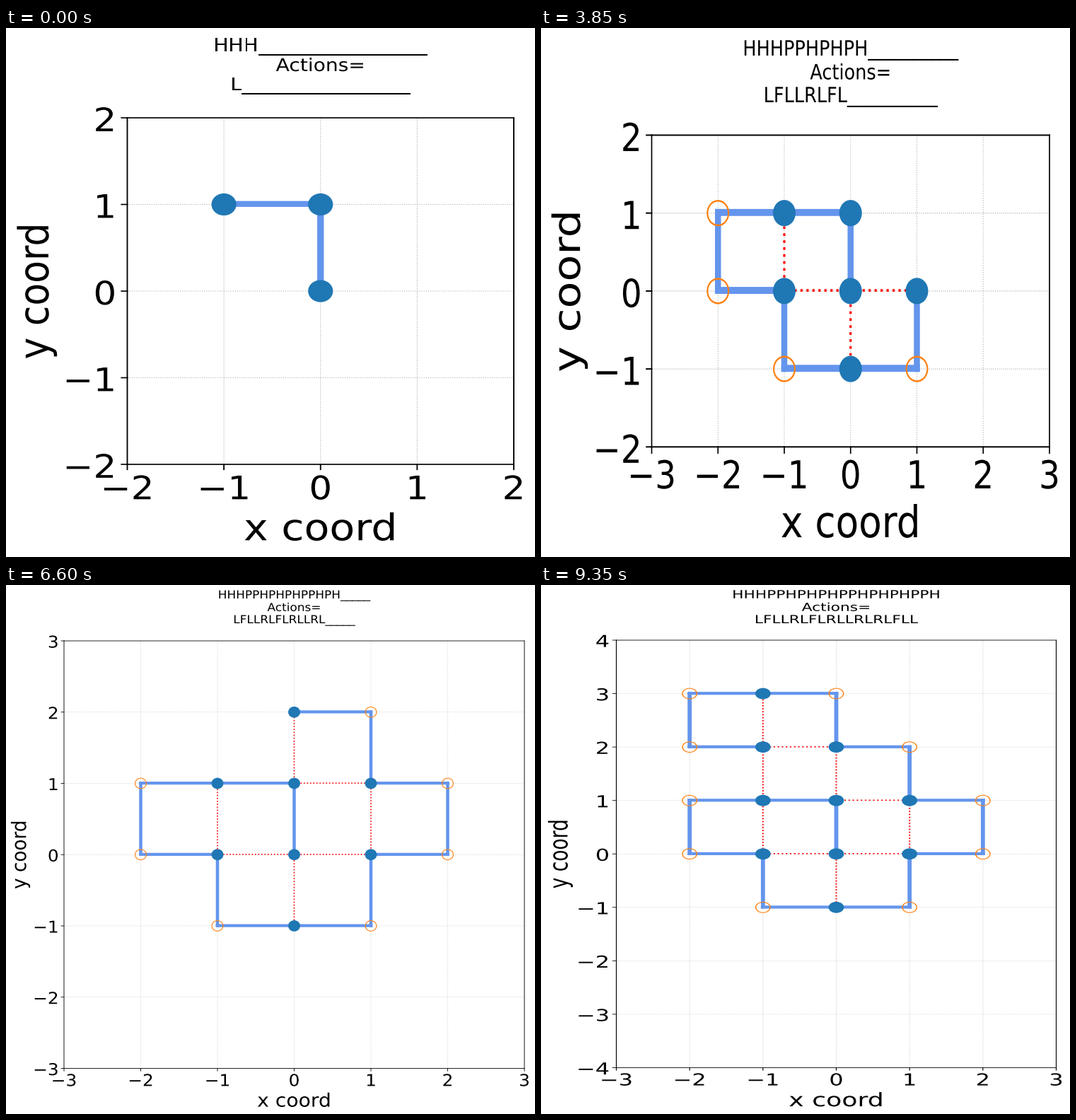
These frames come from a looping animation (748x748 px, 9.9 s). A matplotlib script:

```python
import matplotlib.pyplot as plt
from matplotlib.animation import FuncAnimation
from matplotlib.lines import Line2D
from matplotlib.patches import PathPatch, Rectangle
from matplotlib.path import Path
from matplotlib.textpath import TextPath
from matplotlib.transforms import Affine2D

STAGE, DPI = 748, 88
PX = 72 / DPI
SEQUENCE = "HHHPPHPHPHPPHPHPHPPH"
ACTIONS = "LFLLRLFLRLLRLRLFLL"
EDGE, FILLED, OPEN = "#6495ed", "#1f77b4", "#ff7f0e"
LABEL, TICK = 25, 22

# first step, axes box (left, right, top, bottom), x limit range, y limit,
# pixels per point in x and y, title size, top of the title
LAYOUTS = [
    (0, (171.5, 718, 127, 617), (-2, 2), 2, (2.344, 2.08), 12, 14.5),
    (1, (156.5, 719, 151.5, 592.3), (-3, 3), 2, (2.13, 2.476), 12, 17.3),
    (8, (77.5, 734.5, 103, 664), (-3, 3), 2, (1.048, 1.345), 15, 9.7),
    (11, (82, 733, 79, 683.5), (-3, 3), 3, (1.128, 1.05), 15, 7.6),
    (13, (106.5, 728.5, 79.5, 682.5), (-3, 3), 4, (1.453, 1.052), 15, 7.7),
    (17, (106.5, 728.5, 78, 682.5), (-3, 3), 4, (1.45, 1.058), 15, 7.2),
]


def fold(actions):
    """Lattice points of the chain, turning left or right at each action."""
    x, y, dx, dy = 0, 1, 0, 1
    points = [(0, 0), (0, 1)]
    for a in actions:
        if a == "L":
            dx, dy = -dy, dx
        elif a == "R":
            dx, dy = dy, -dx
        x, y = x + dx, y + dy
        points.append((x, y))
    return points


def glyphs(s, size):
    return TextPath((0, 0), s, size=size, prop={"family": "DejaVu Sans"})


def advance(s, size):
    """Pen advance of a string, side bearings included."""
    return glyphs(s + "_", size).get_extents().x1 - glyphs("_", size).get_extents().x1


POINTS = fold(ACTIONS)

fig = plt.figure(figsize=(STAGE / DPI, STAGE / DPI), dpi=DPI, facecolor="white")
ax = fig.add_axes([0, 0, 1, 1])


class Page:
    """Draws sizes given in points, with the page scaled to the stage."""

    def __init__(self, layout):
        _, self.box, self.xlim, self.ymax, self.scale, self.title, self.top = layout

    def at(self, p, lift=0):
        left, right, top, bottom = self.box
        x0, x1 = self.xlim
        return (left + (p[0] - x0) / (x1 - x0) * (right - left),
                bottom - (p[1] + self.ymax) / (2 * self.ymax) * (bottom - top)
                - lift * self.scale[1])

    def shape(self, path, x, y, color, z):
        sx, sy = self.scale
        move = Affine2D().scale(sx, -sy).translate(x, y) + ax.transData
        ax.add_artist(PathPatch(path, transform=move, fc=color, lw=0, zorder=z))

    def text(self, s, size, x, y, align=0.5, angle=0):
        shift = -align * advance(s, size)
        place = Affine2D().translate(shift, 0).rotate_deg(angle)
        self.shape(place.transform_path(glyphs(s, size)), x, y, "black", 6)

    def bar(self, a, b, width, color, z):
        hx, hy = (width * s / 2 for s in self.scale)
        x0, x1 = sorted((a[0], b[0]))
        y0, y1 = sorted((a[1], b[1]))
        ax.add_artist(Rectangle((x0 - hx, y0 - hy), x1 - x0 + 2 * hx,
                                y1 - y0 + 2 * hy, fc=color, lw=0, zorder=z,
                                snap=False))

    def dots(self, a, b, width, color, z):
        sx, sy = self.scale
        along, across = (sx, sy) if abs(a[1] - b[1]) < 1e-6 else (sy, sx)
        k = along / across
        ax.add_artist(Line2D((a[0], b[0]), (a[1], b[1]), color=color, zorder=z,
                             lw=width * across * PX, dash_capstyle="butt",
                             linestyle=(0, (k, 1.65 * k)), snap=False))

    def marker(self, p, kind):
        x, y = self.at(p)
        outer = Path.circle((0, 0), 7.5)
        if kind == "H":
            self.shape(outer, x, y, FILLED, 4)
            return
        inner = Path.circle((0, 0), 6.5)
        hole = Path(inner.vertices[:-1][::-1], inner.codes[:-1])
        self.shape(Path.make_compound_path(outer, hole), x, y, OPEN, 4)

    def axes(self):
        left, right, top, bottom = self.box
        sx, sy = self.scale
        x0, x1 = self.xlim
        for v in range(x0, x1 + 1):
            x = self.at((v, 0))[0]
            if x0 < v < x1:
                self.dots((x, bottom), (x, top), 0.5, "#b0b0b0", 1)
            self.bar((x, bottom), (x, bottom + 3.5 * sy), 0.8, "black", 5)
            self.text(f"{v}".replace("-", "\u2212"), TICK, x, bottom + 23.7 * sy)
        for v in range(-self.ymax, self.ymax + 1):
            y = self.at((0, v))[1]
            if abs(v) < self.ymax:
                self.dots((left, y), (right, y), 0.5, "#b0b0b0", 1)
            self.bar((left - 3.5 * sx, y), (left, y), 0.8, "black", 5)
            self.text(f"{v}".replace("-", "\u2212"), TICK,
                      left - 6.5 * sx, y + 9.1 * sy, align=1)
        corners = [(left, top), (right, top), (right, bottom), (left, bottom)]
        for a, b in zip(corners, corners[1:] + corners[:1]):
            self.bar(a, b, 0.8, "black", 5)
        self.text("x coord", LABEL, (left + right) / 2, bottom + 51.6 * sy)
        self.text("y coord", LABEL, left - 47.6 * sx, (top + bottom) / 2, angle=90)

    def heading(self, lines):
        x = (self.box[0] + self.box[1]) / 2
        em = self.title * self.scale[1]
        for s, drop in zip(lines, (0.729, 1.86, 2.95)):
            self.text(s, self.title, x, self.top + drop * em)


def draw(step):
    ax.clear()
    ax.set(xlim=(0, STAGE), ylim=(STAGE, 0))
    ax.axis("off")
    page = Page([row for row in LAYOUTS if row[0] <= step][-1])
    page.axes()

    count = step + 3
    blank = "_" * (len(SEQUENCE) - count)
    page.heading([SEQUENCE[:count] + blank, "Actions=",
                  ACTIONS[:step + 1] + blank])

    chain = POINTS[:count]
    # bonds sit slightly above the marker centres
    ends = [page.at(p, lift=0.35) for p in chain]
    for a, b in zip(ends, ends[1:]):
        page.bar(a, b, 4, EDGE, 3)
    for i, p in enumerate(chain):
        page.marker(p, SEQUENCE[i])
        for j, q in enumerate(chain[:max(i - 1, 0)]):
            touching = abs(p[0] - q[0]) + abs(p[1] - q[1]) == 1
            if touching and SEQUENCE[i] == SEQUENCE[j] == "H":
                page.dots(ends[j], ends[i], 1.5, "red", 2)
    return []


anim = FuncAnimation(fig, draw, frames=len(ACTIONS), interval=550,
                     init_func=lambda: [], repeat=True)
plt.show()
```
